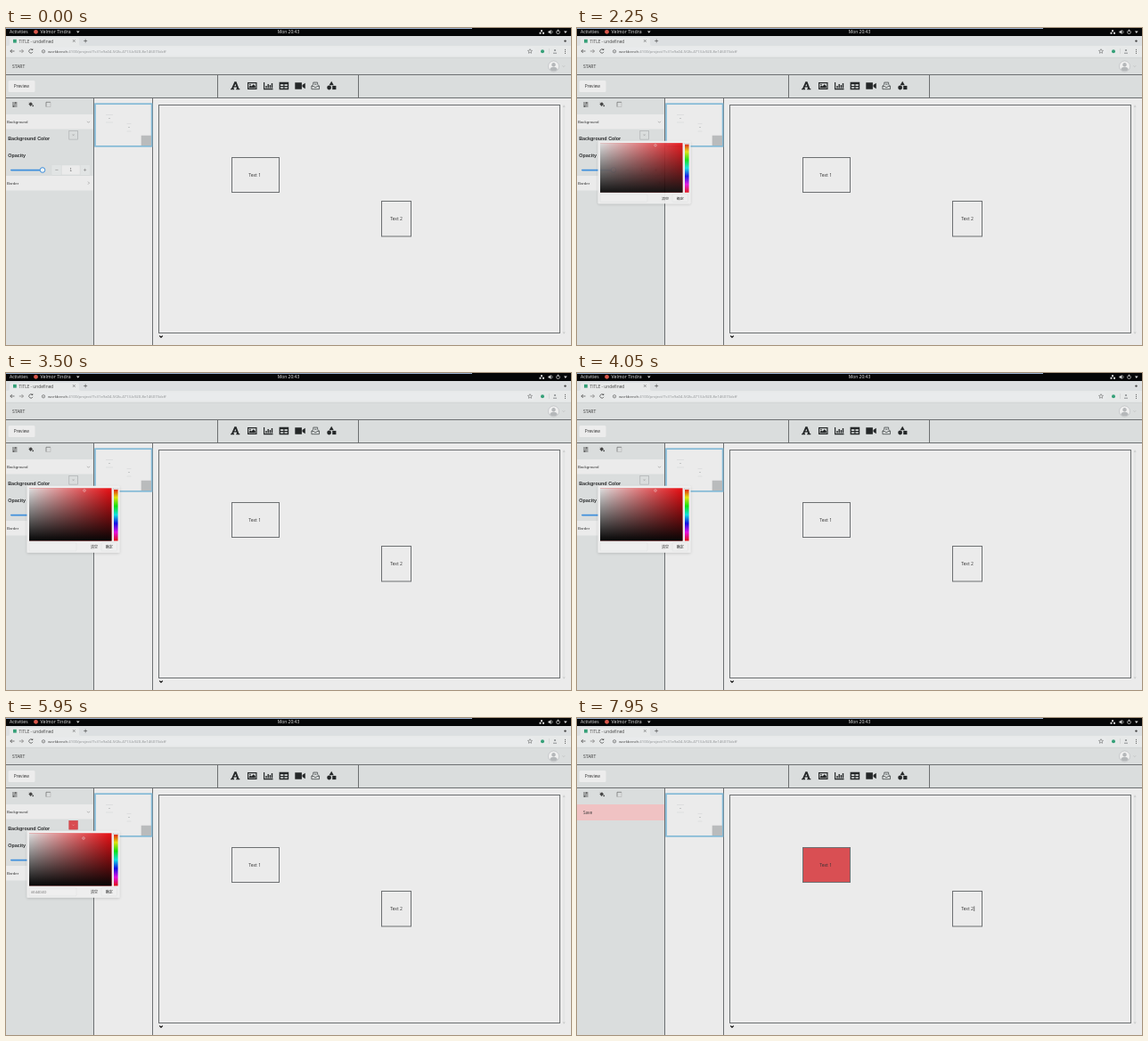
An HTML page that plays this animation: 634x356 px, repeating every 8 s.

```html
<!DOCTYPE html>
<html lang="en">
<head>
<meta charset="utf-8">
<title>Slide editor</title>
<style>
html, body { margin: 0; width: 100%; height: 100%; overflow: hidden; background: #ebebeb; }
svg { display: block; width: 100vw; height: 100vh; }
text { font-family: "Open Sans", "Noto Sans", sans-serif; }
.ui { font-family: "Liberation Sans", Arial, sans-serif; }
.cjk { font-family: "Noto Sans CJK SC", "Noto Sans CJK", sans-serif; }
.b { font-weight: bold; }
.mid { text-anchor: middle; }
</style>
</head>
<body>
<svg id="stage" viewBox="0 0 634 356">
  <defs>
    <linearGradient id="white"><stop stop-color="#dedede"/><stop offset="1" stop-color="#dedede" stop-opacity="0"/></linearGradient>
    <linearGradient id="black" x2="0" y2="1"><stop stop-color="#060606" stop-opacity="0"/><stop offset="1" stop-color="#060606"/></linearGradient>
    <linearGradient id="hue" x2="0" y2="1"></linearGradient>
    <filter id="shadow" x="-10%" y="-10%" width="120%" height="125%">
      <feDropShadow dx="0" dy="1" stdDeviation="1.6" flood-opacity=".16"/>
    </filter>
  </defs>
  <g id="chrome"></g>
  <g id="tools"></g>
  <g id="work"></g>
  <g id="panel"></g>
  <g id="saved"></g>
  <g id="picker"></g>
</svg>
<script>
const NS = 'http://www.w3.org/2000/svg';
const LINE = '#6c6f71', INK = '#252829', BAR = '#e7e9e9', PANEL = '#dadddd', PAGE = '#ebebeb';
const $ = id => document.getElementById(id);
let layer;

function add(tag, attrs, text) {
  const el = document.createElementNS(NS, tag);
  for (const k in attrs) el.setAttribute(k, attrs[k]);
  if (text) el.textContent = text;
  layer.appendChild(el);
  return el;
}
const rect = (x, y, width, height, fill, more) => add('rect', {x, y, width, height, fill, ...more});
const circle = (cx, cy, r, fill, more) => add('circle', {cx, cy, r, fill, ...more});
const text = (x, y, size, str, fill = '#333', cls = '') =>
  add('text', {x, y, 'font-size': size, fill, class: cls}, str);
const path = (d, stroke = '#333', width = .7, fill = 'none') =>
  add('path', {d, stroke, 'stroke-width': width, fill});
const shape = (d, fill = INK) => add('path', {d, fill, 'fill-rule': 'evenodd'});
const frame = (x, y, w, h, fill = 'none') => rect(x, y, w, h, fill, {stroke: LINE, 'stroke-width': 1});

function drawChrome() {
  layer = $('chrome');
  rect(0, 0, 634, 9, '#050607');
  rect(0, 0, 523, 1, '#9db4d4');
  text(4, 6.2, 5, 'Activities', '#e8e8e8');
  circle(33.5, 4.3, 2.4, '#d9574b');
  text(38.5, 6.2, 5.2, 'Velmor Tindra', '#e8e8e8');
  shape('M79 3.4h3.6l-1.8 2.3z', '#ddd');
  text(317, 6.2, 5, 'Mon 20:43', '#e8e8e8', 'mid');
  shape('M600 2.2h2v2h-2zM598.5 4.8h2v2h-2zM602 4.8h2v2h-2z', '#ddd');
  shape('M608.5 3.6h1.3l1.7-1.6v5l-1.7-1.6h-1.3z', '#ddd');
  path('M612.5 2.8q1.3 1.6 0 3.3', '#ddd', .6);
  circle(619.5, 4.6, 1.9, 'none', {stroke: '#ddd', 'stroke-width': .7});
  path('M619.5 1.6v2.5', '#ddd');
  shape('M626 3.6h3.6l-1.8 2.3z', '#ddd');

  rect(0, 9, 634, 11, '#dcdfe1');
  shape('M2 20q2 0 2-2v-5q0-2 2-2h74q2 0 2 2v5q0 2 2 2z', BAR);
  rect(8, 12.8, 3.8, 3.8, '#35a078');
  text(14.5, 16.6, 4.8, 'TITLE - undefined', '#444');
  path('M75 13.2l2.6 2.6m0-2.6l-2.6 2.6', '#555', .6);
  path('M87.2 14.5h4m-2-2v4', '#444', .6);
  circle(627.5, 14.6, 1.2, '#444');

  rect(0, 20, 634, 13, BAR);
  path('M9.5 26H4.8m2-2l-2 2 2 2', '#444');
  path('M14.8 26h4.7m-2-2l2 2-2 2', '#777');
  path('M29.7 24.6a2.2 2.2 0 1 0 .3 2.2', '#444');
  shape('M30.2 23v2.1h-2.1z', '#444');
  rect(37, 21.5, 557, 9.5, '#e9ebec', {rx: 4.7});
  circle(42, 26.3, 1.7, 'none', {stroke: '#555', 'stroke-width': .6});
  path('M42 25.8v1.3', '#555', .5);
  const url = text(47, 28, 4.27, 'workbench', '#444');
  url.appendChild(add('tspan', {fill: '#8a8d8f'}, ':4100/project/7c31e9a04-5f2b-4713-b920-8e146073dcff'));
  path('M588 23.6l.7 1.6 1.8.2-1.3 1.2.4 1.7-1.6-.9-1.6.9.4-1.7-1.3-1.2 1.8-.2z', '#555', .5);
  circle(602, 26.2, 2, '#35a078');
  path('M609.5 23v6', '#c4c6c7', .5);
  circle(616, 25, 1.1, '#8b8f91');
  path('M614 28.2h4', '#8b8f91', 1);
  for (const y of [24.2, 26.2, 28.2]) circle(627.5, y, .55, '#444');
}

function drawTools() {
  layer = $('tools');
  rect(0, 33, 634, 45, PANEL);
  path('M0 33.2h634', '#c6c9ca', .5);
  text(7, 44.6, 5, 'START');
  circle(614.5, 43, 6, '#f0f0f0', {stroke: '#b5b8ba', 'stroke-width': .6});
  circle(614.5, 41.3, 2.2, '#b5b8ba');
  shape('M610.3 47q.3-3.2 4.2-3.2t4.2 3.2q-4.2 3.2-8.4 0z', '#b5b8ba');
  path('M624.5 42.3l1.3 1.3 1.3-1.3', '#aaa', .5);
  path('M0 52.5h634M237.5 52.5v26M395.5 52.5v26M0 78.5h634', LINE, 1);
  rect(2.5, 59, 30, 13, '#ececec', {rx: 1.5});
  text(17.4, 67.4, 4.8, 'Preview', '#333', 'mid');

  shape('M256.4 60.3h2.1l2.9 7.7h.9v1.3h-4V68h.8l-.5-1.4h-2.8l-.5 1.4h.8v1.3h-4V68h.9zM257.3 62.7l-1 2.6h2z');
  shape('M271 61h10.5v8H271zM272.2 62.2v5.6h8.1v-5.6z');
  shape('M272.7 67.3v-1.2l1.6-1.6 1.1 1.1 2.4-2.4 2 2v2.1z');
  circle(273.9, 63.6, .8, INK);
  shape('M289 61h1.2v7.1h9.3v1.2H289zM291.3 65h1.4v2.5h-1.4zM293.5 63h1.4v4.5h-1.4zM295.7 64h1.4v3.5h-1.4zM297.8 62h1.4v5.5h-1.4z');
  shape('M306.6 60.8h10.6v8.4h-10.6zM308 63.3v1.6h3.3v-1.6zM312.5 63.3v1.6h3.3v-1.6zM308 66.2v1.6h3.3v-1.6zM312.5 66.2v1.6h3.3v-1.6z');
  shape('M324.3 61.2h7.6v7.6h-7.6zM332.5 64l3.3-2.3v6.6l-3.3-2.3z');
  path('M342.9 65.2v3.5h8.6v-3.5l-1.9-2v-2.1h-4.8v2.1zM342.9 65.4h2.6l.8 1.3h1.8l.8-1.3h2.6M345.9 63.2h2.6', '#45494b', .8);
  shape('M365.2 59.8l2.6 4.4h-5.2z');
  circle(362.6, 67, 2.4, INK);
  rect(366.2, 64.9, 4.2, 4.2, INK);
}

let box1, caret;
function drawWork() {
  layer = $('work');
  rect(99, 79, 535, 277, PAGE);
  path('M98.5 79v277M164.5 79v277', LINE, 1);

  rect(100, 85.2, 63.6, 47.6, PAGE, {stroke: '#82b9d6', 'stroke-width': 1.7});
  rect(151.7, 120.7, 11.3, 11.3, '#b9bbbc');
  for (const [x, y, w] of [[112, 97.5, 8], [135.5, 107.5, 5]]) {
    path(`M${x} ${y}h${w}M${x} ${y + 8.5}h${w}`, '#cfd1d2', .5);
    rect(x + w / 2 - .8, y + 3.5, 1.6, 1, '#bbbebf');
  }

  frame(171.5, 86.5, 450, 256, PAGE);
  rect(625, 86, 2.2, 258, '#e4e5e5');
  path('M625.3 88.6l.8-.9.8.9M625.3 341.6l.8.9.8-.9', '#888', .5);
  path('M172.2 345.7l1.8 1.8 1.8-1.8', '#111', 1.2);

  box1 = frame(253.5, 145.5, 53, 39);
  text(279.2, 166.6, 5, 'Text 1', '#333', 'mid');
  frame(421.5, 194.5, 33, 39.5);
  text(438, 216.4, 5, 'Text 2', '#333', 'mid');
  caret = path('M445.7 211.4v5.6', '#222', .6);
}

let swatch, swatchMark;
function drawPanel() {
  layer = $('panel');
  rect(0, 79, 98, 277, PANEL);
  path('M7 84h5.5M7 86h5.5M7 88h5.5', '#444', .8);
  circle(10.8, 84, .8, '#444');
  circle(8.6, 88, .8, '#444');
  shape('M25.4 85.2l2.6-2 2 2.4-2.6 2.4z', '#444');
  path('M26 83.6l1 1', '#444', .6);
  circle(30.2, 87.3, .9, '#444');
  path('M45 88.5v-5.2h5', '#555', .6);
  path('M50 83.3v5.2h-5', '#aaa', .5);

  layer = $('saved');
  rect(0, 97, 98, 18, '#f0c2c3');
  text(7, 107.8, 4.6, 'Save');

  layer = $('panel');
  layer = add('g', {id: 'form'});
  rect(0, 97, 97.5, 16.5, PAGE);
  text(1, 107, 4.4, 'Background', '#333', 'ui');
  path('M91 104.8l1.5 1.5 1.5-1.5', '#777', .5);
  text(2.2, 125.5, 5.4, 'Background Color', '#2b2d2e', 'ui b');
  swatch = rect(70.8, 115.3, 9.6, 9.8, PANEL, {'stroke-width': .6});
  swatchMark = path('', '#999', .5);
  text(2.2, 145.3, 5.4, 'Opacity', '#2b2d2e', 'ui b');
  rect(5, 158.7, 36, 1.7, '#3f8fdc', {rx: .8});
  circle(41, 159.5, 2.8, '#f4f4f4', {stroke: '#3f8fdc', 'stroke-width': 1});
  rect(51.3, 153.8, 43, 11.2, PAGE, {rx: 1, stroke: '#cfd2d3', 'stroke-width': .5});
  rect(51.5, 154, 10.7, 10.8, '#e1e4e4');
  rect(83.3, 154, 10.7, 10.8, '#e1e4e4');
  path('M62.3 154v11M83.2 154v11', '#cfd2d3', .5);
  path('M55.3 159.4h3.2M87 159.4h3.2m-1.6-1.6v3.2', '#777', .5);
  text(72.8, 161.2, 4.5, '1', '#666', 'ui mid');
  rect(0, 166, 97.5, 16.5, PAGE);
  text(1, 175.8, 4.4, 'Border', '#333', 'ui');
  path('M92 172.6l1.5 1.5-1.5 1.5', '#777', .5);
}

let dot, hex;
function drawPicker() {
  layer = $('hue');
  for (let i = 0; i <= 6; i++)
    add('stop', {offset: i / 6, 'stop-color': `hsl(${i * 60} 88% 47%)`});
  layer = $('picker');
  rect(23.5, 126.8, 104, 75, '#eeeeee', {rx: 1, filter: 'url(#shadow)'});
  for (const fill of ['#e80d12', 'url(#white)', 'url(#black)']) rect(26, 129.3, 92.5, 59.2, fill);
  rect(121, 130, 4.6, 58.5, 'url(#hue)');
  rect(120.6, 129.3, 5.4, 1.6, '#eee', {stroke: '#bbb', 'stroke-width': .3});
  dot = circle(88, 132, 1.3, 'none', {stroke: '#e9c5c5', 'stroke-width': .6});
  rect(26, 190.8, 53, 9, '#efefef', {rx: 1, stroke: '#dcdede', 'stroke-width': .5});
  hex = text(28, 196.7, 4, '#E44D4D', '#777', 'ui');
  text(99, 196.9, 4, '清空', '#333', 'cjk mid');
  rect(107, 190.5, 17.5, 9.3, '#efefef', {rx: 1, stroke: '#dcdede', 'stroke-width': .5});
  text(115.8, 196.9, 4, '确定', '#222', 'cjk mid');
}

const LOOP = 8000, OPEN = 2100, PICK = 4200, CONFIRM = 6300, SAVE = 7800, FADE = 300;
const show = (el, on) => el.setAttribute('visibility', on ? 'visible' : 'hidden');
const clamp = v => Math.min(1, Math.max(0, v));
const ramp = (t, start) => 1 - (1 - clamp((t - start) / FADE)) ** 4;

function render(t) {
  const open = ramp(t, OPEN) - ramp(t, CONFIRM);
  show($('picker'), open > .005);
  $('picker').setAttribute('opacity', open);
  $('picker').setAttribute('transform', `translate(0 126.8) scale(1 ${open}) translate(0 -126.8)`);

  const picked = t >= PICK;
  const drag = clamp((t - PICK) / 200);
  dot.setAttribute('cx', 88 - drag);
  dot.setAttribute('cy', 132 + 3 * drag);
  hex.setAttribute('visibility', picked ? 'inherit' : 'hidden');
  swatch.setAttribute('fill', picked ? '#d94c50' : PANEL);
  swatch.setAttribute('stroke', picked ? '#c7484c' : '#a5a8aa');
  swatchMark.setAttribute('d', picked ? 'M74.4 119.6l1.2 1.2 1.2-1.2' : 'M74.6 119.2l2 2m0-2l-2 2');
  swatchMark.setAttribute('stroke', picked ? '#eeb5b6' : '#999');

  box1.setAttribute('fill', t >= CONFIRM ? '#d94f53' : 'none');
  const saved = t >= SAVE;
  $('form').setAttribute('display', saved ? 'none' : 'inline');
  show($('saved'), saved);
  show(caret, saved);
}

drawChrome();
drawTools();
drawWork();
drawPanel();
drawPicker();

const start = performance.now();
function tick() {
  render((performance.now() - start) % LOOP);
  requestAnimationFrame(tick);
}
tick();
</script>
</body>
</html>
```
